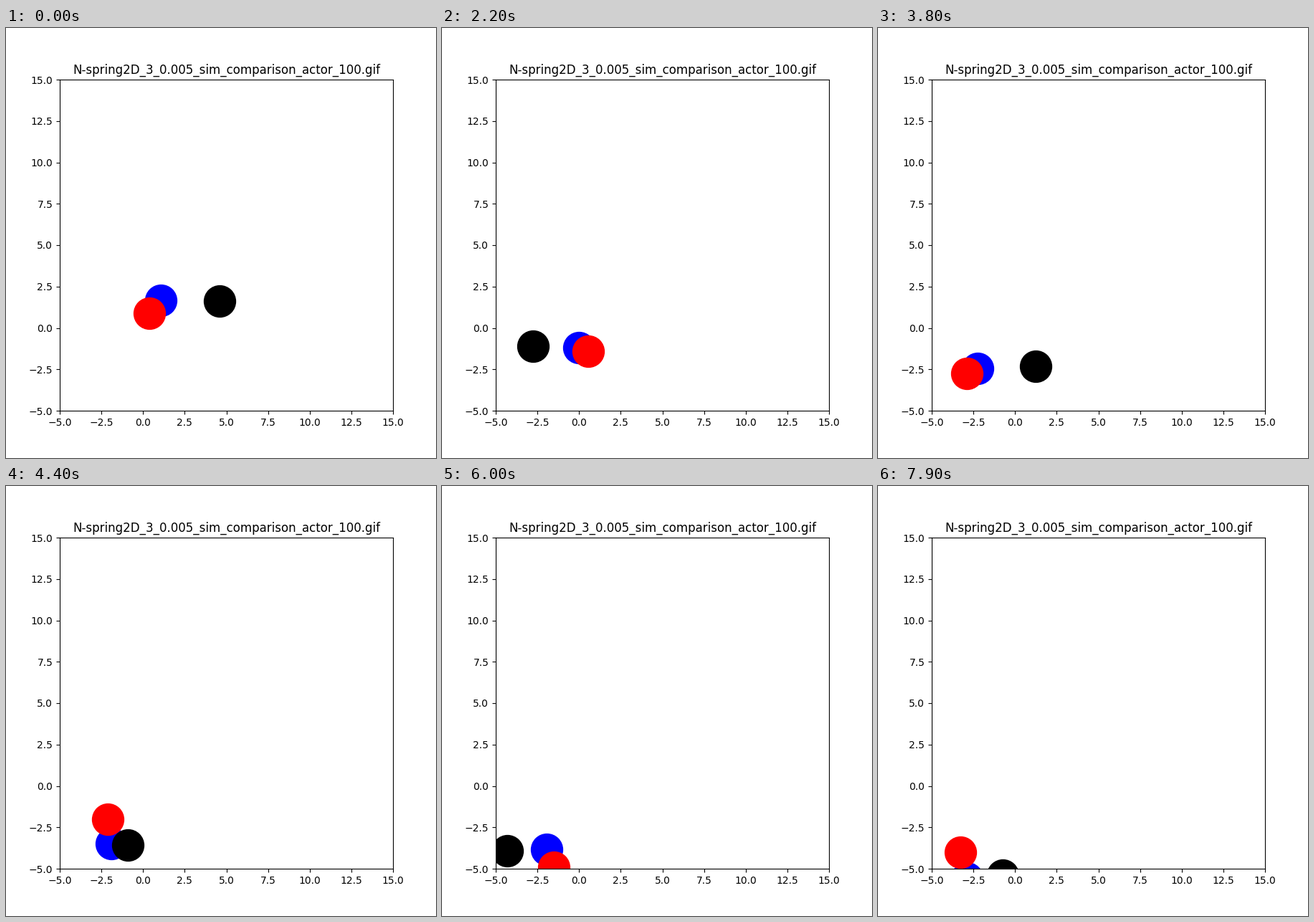
Animation, 600 px wide and 600 px high, one loop 8000 ms. Source, as a matplotlib script:

```python
import numpy as np
import matplotlib.pyplot as plt
from matplotlib.animation import FuncAnimation

FRAMES, STEP_MS = 80, 100


def drift(t):
    """Shared centre, slowing down as it sinks to the lower left."""
    x = -2.49 + 0.00082 * (t - 72) ** 2
    y = 1.31 - 0.1234 * t + 0.00054 * t**2
    return np.array([x, y])


def swing(t, size, peak, period):
    return size * np.cos(2 * np.pi * (t - peak) / period)


def position(t, side, lift):
    """Centre plus a swing per axis; the vertical one slowly grows."""
    gain = 0.8 + 0.005 * t
    return drift(t) + [swing(t, *side), gain * swing(t, *lift)]


# colour: sideways and vertical swing as (size, peak step, period)
BALLS = {
    "blue": ((0.79, 16, 38), (-0.54, 13.8, 34.5)),
    "red": ((1.45, 17, 37.5), (-1.26, 29.6, 36)),
    "black": ((2.84, 0, 36.8), (-0.78, 12.5, 36.8)),
}

fig, ax = plt.subplots(figsize=(6, 6), dpi=100)
ax.set(xlim=(-5, 15), ylim=(-5, 15))
ax.set_title("N-spring2D_3_0.005_sim_comparison_actor_100.gif")
dots = [ax.scatter(*position(0, *swings), s=1000, color=color, linewidths=1)
        for color, swings in BALLS.items()]


def update(i):
    for dot, swings in zip(dots, BALLS.values()):
        dot.set_offsets(position(i, *swings))
    return dots


anim = FuncAnimation(fig, update, frames=FRAMES, interval=STEP_MS,
                     repeat=True, repeat_delay=0)
plt.show()
```
